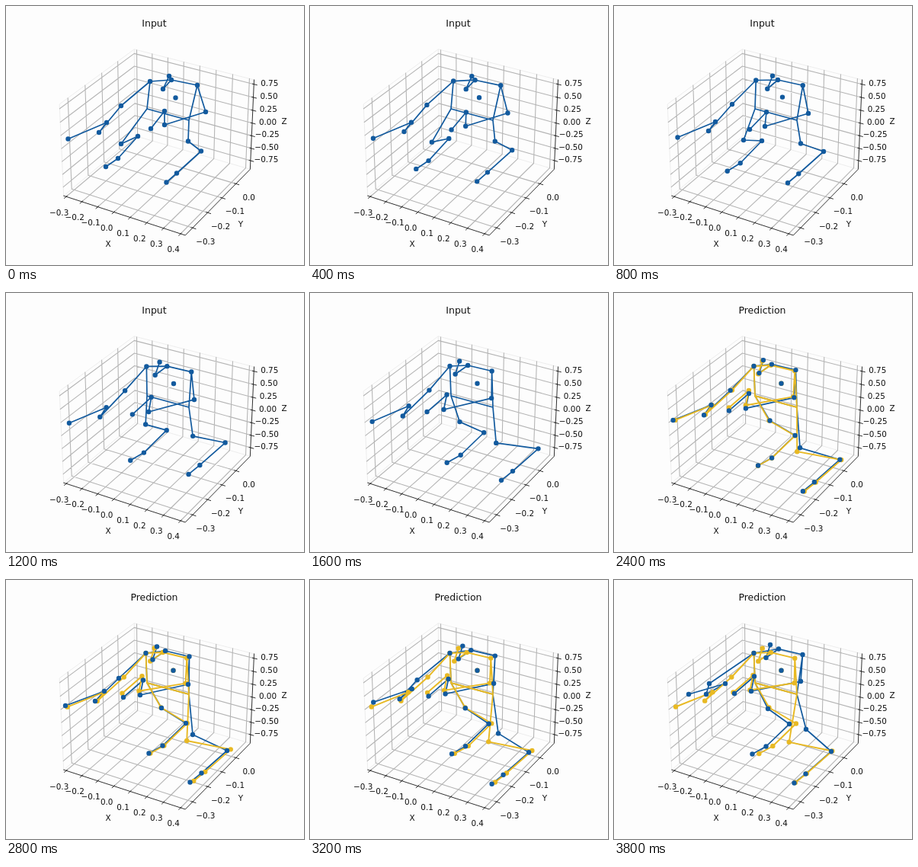
Animation of 391 by 340 pixels, one loop 4 s. Source, as an HTML page:

```html
<!DOCTYPE html>
<html lang="en">
<head>
<meta charset="utf-8">
<title>Pose plot</title>
<style>
  html, body { margin: 0; width: 100%; height: 100%; overflow: hidden; background: #fdfdfd; }
  svg { display: block; width: 391px; height: 340px; }
  path { fill: none; stroke-linejoin: round; stroke-linecap: round; }
  text { font: 10.4px "DejaVu Sans", sans-serif; text-anchor: middle; fill: #111; }
  #title { font-size: 12.5px; }
</style>
</head>
<body>
<svg id="stage" viewBox="0 0 391 340">
  <text id="title" x="194.5" y="27"></text>
</svg>
<script>
const stage = document.getElementById("stage");
const title = document.getElementById("title");
const BLUE = "#125a9e", GOLD = "#e8b923";
const STEP = 200, STEPS = 20, SWITCH = 10;

function add(tag, attrs, text = "") {
  const el = document.createElementNS("http://www.w3.org/2000/svg", tag);
  for (const key in attrs) el.setAttribute(key, attrs[key]);
  el.textContent = text;
  return stage.appendChild(el);
}
const stroke = (color, width, d = "") => add("path", { stroke: color, "stroke-width": width, d });
const chain = pts => "M" + pts.map(p => p.map(v => v.toFixed(2)).join(" ")).join("L");

// Perspective view of the unit box: elevation 30, azimuth -60
function project([a, b, c]) {
  const x = (a - 0.5) * 1.143, y = (b - 0.5) * 1.143, z = (c - 0.5) * 0.857;
  const k = 1600 / (10 - (0.433 * x - 0.75 * y + 0.5 * z));
  return [200.2 + k * (0.866 * x + 0.5 * y),
          173.3 - k * (-0.25 * x + 0.433 * y + 0.866 * z)];
}
const line = (...pts) => chain(pts.map(project));

const axes = [
  { name: "X", label: [134, 312], first: -0.3, step: 0.1, count: 8, from: 0.022, to: 0.963, digits: 1,
    shift: [-9.4, 20.6], grid: t => [[t, 0, 0], [t, 1, 0], [t, 1, 1]], tick: (t, d) => [t, -d, 0] },
  { name: "Y", label: [308, 286], first: -0.3, step: 0.1, count: 4, from: 0.104, to: 0.765, digits: 1,
    shift: [17, 17.5], grid: t => [[1, t, 0], [0, t, 0], [0, t, 1]], tick: (t, d) => [1 + d, t, 0] },
  { name: "Z", label: [365, 151], first: -0.75, step: 0.25, count: 7, from: 0.1, to: 0.953, digits: 2,
    shift: [20.5, -1.8], grid: t => [[0, 0, t], [0, 1, t], [1, 1, t]], tick: (t, d) => [1 + d, 1, t] }
];

stroke("#ebebeb", 0.9,
  line([0, 0, 0], [0, 0, 1], [0, 1, 1], [1, 1, 1]) +
  line([0, 0, 0], [0, 1, 0], [1, 1, 0]) + line([0, 1, 0], [0, 1, 1]));
const grid = stroke("#b5b5b5", 1.1);
const frame = stroke("#1a1a1a", 0.9);
let gridPath = "", framePath = line([0, 0, 0], [1, 0, 0], [1, 1, 0], [1, 1, 1]);
for (const ax of axes) {
  for (let i = 0; i < ax.count; i++) {
    const t = ax.from + (ax.to - ax.from) * i / (ax.count - 1);
    const value = ax.first + ax.step * i;
    const [x, y] = project(ax.tick(t, 0));
    gridPath += line(...ax.grid(t));
    framePath += line(ax.tick(t, -0.012), ax.tick(t, 0.025));
    const sign = value < -0.01 ? "\u2212" : "";
    add("text", { x: x + ax.shift[0], y: y + ax.shift[1] + 3.8 }, sign + Math.abs(value).toFixed(ax.digits));
  }
  add("text", { x: ax.label[0], y: ax.label[1] + 3.8 }, ax.name);
}
grid.setAttribute("d", gridPath);
frame.setAttribute("d", framePath);

// Leading joints pass through a few points; drift is how the prediction moves on
const KEYS = [0, 4, 9, 14, 19];
const leaders = {
  neck:   { path: [[217, 97], [215, 97], [206, 94.5], [209, 93], [216, 90.5]], drift: [0, 1] },
  elbowL: { path: [[151, 131], [155, 129], [156, 127.5], [148, 129], [125, 136]], drift: [-1, 0] },
  wristL: { path: [[122, 166], [124, 164], [121, 161], [117, 159], [121, 150]], drift: [-1, -2] },
  handL:  { path: [[132, 153], [133, 152], [129, 147.5], [129, 146], [146, 136]], drift: [1, 0] },
  tipL:   { path: [[81.5, 174.5], [83.5, 172.5], [81, 168], [78, 165], [98, 150]], drift: [1, -1] },
  elbowR: { path: [[262, 139], [255, 141], [235.5, 137.5], [239, 137], [245, 133]], drift: [2, -2] },
  wristR: { path: [[208, 156], [198, 158], [172, 152], [176, 151], [180, 146]], drift: [8, -7] },
  kneeL:  { path: [[151, 181], [170, 176], [201, 168], [204, 168], [202, 169]], drift: [0, 0] },
  heelL:  { path: [[173, 171], [194, 177], [234, 184.5], [236, 188], [230, 189]], drift: [2, 3] },
  kneeR:  { path: [[239, 177.5], [245, 180.5], [244, 200], [245, 203], [252, 196]], drift: [-15, 11] },
  heelR:  { path: [[256, 190.5], [275, 191], [302.5, 208], [290, 224], [285, 225]], drift: [-17, 13] }
};

// Following joints keep an offset from a parent that settles from one value to another
const followers = {
  shoulderL: ["origin", [189, 99], [183.5, 96]],
  shoulderR: ["neck", [34, 7], [31.5, 7.5]],
  face:      ["neck", [-11, 12], [-16.5, 11.5]],
  crown:     ["neck", [-3, -5], [-11, -5.5]],
  handR:     ["wristR", [0, -18], [4, -19.5]],
  tipR:      ["handR", [-18, 23], [-26, 22.5]],
  ankleL:    ["heelL", [-26, 29], [-30.5, 29.5]],
  toeL:      ["ankleL", [-16, 11], [-18, 10]],
  ankleR:    ["heelR", [-32, 29], [-33.5, 29.5]],
  toeR:      ["ankleR", [-13.5, 12], [-15, 12]],
  core:      ["origin", [222.5, 120.5], [219.5, 118.7]]
};

const bones = [
  "shoulderL elbowL wristL handL tipL", "shoulderR elbowR wristR handR tipR",
  "shoulderL neck shoulderR", "neck face crown", "hipL hipR",
  "shoulderL hipL kneeL heelL ankleL toeL", "shoulderR hipR kneeR heelR ankleR toeR"
].map(names => names.split(" "));
const dotted = [...Object.keys(leaders), ...Object.keys(followers)];

// Smooth curve through unevenly spaced keys
function spline(vals, t) {
  const last = KEYS.length - 1;
  let i = 0;
  while (i < last - 1 && t >= KEYS[i + 1]) i++;
  const gap = j => KEYS[j + 1] - KEYS[j];
  const rate = j => (vals[j + 1] - vals[j]) / gap(j);
  const inner = j => (rate(j - 1) * gap(j) + rate(j) * gap(j - 1)) / (gap(j - 1) + gap(j));
  const slope = j => j === 0 ? 2 * rate(0) - inner(1)
    : j === last ? 2 * rate(last - 1) - inner(last - 1) : inner(j);
  const h = gap(i), s = (t - KEYS[i]) / h, r = 1 - s;
  return vals[i] * (1 + 2 * s) * r * r + vals[i + 1] * s * s * (3 - 2 * s)
    + h * s * r * (slope(i) * r - slope(i + 1) * s);
}

// Drift runs evenly across and eases out downwards
function pose(step, drift = 0) {
  const at = { origin: [0, 0], hipL: [185, 135], hipR: [240, 150] };
  const push = [drift, 1 - (1 - drift) ** 3];
  for (const name in leaders) {
    const { path, drift: way } = leaders[name];
    at[name] = [0, 1].map(k => spline(path.map(p => p[k]), step) + way[k] * push[k]);
  }
  const s = Math.min(1, step / 8), settle = s * s * (3 - 2 * s);
  for (const name in followers) {
    const [parent, from, to] = followers[name];
    at[name] = [0, 1].map(k => at[parent][k] + from[k] + (to[k] - from[k]) * settle);
  }
  return {
    bones: bones.map(names => chain(names.map(n => at[n]))).join(""),
    dots: dotted.map(n => chain([at[n]]) + "h0").join("")
  };
}

const trueBones = stroke(BLUE, 1.7), guessBones = stroke(GOLD, 1.9);
const guessDots = stroke(GOLD, 6.4), trueDots = stroke(BLUE, 6.4);

function show(boneEl, dotEl, shape) {
  boneEl.setAttribute("d", shape.bones);
  dotEl.setAttribute("d", shape.dots);
}

let shown = -1;
function draw() {
  const step = Math.floor(performance.now() / STEP) % STEPS;
  if (step !== shown) {
    shown = step;
    const predicting = step >= SWITCH;
    title.textContent = predicting ? "Prediction" : "Input";
    show(trueBones, trueDots, pose(step));
    show(guessBones, guessDots, predicting
      ? pose(SWITCH, (step - SWITCH + 0.5) / (STEPS - SWITCH))
      : { bones: "", dots: "" });
  }
  requestAnimationFrame(draw);
}
draw();
</script>
</body>
</html>
```
